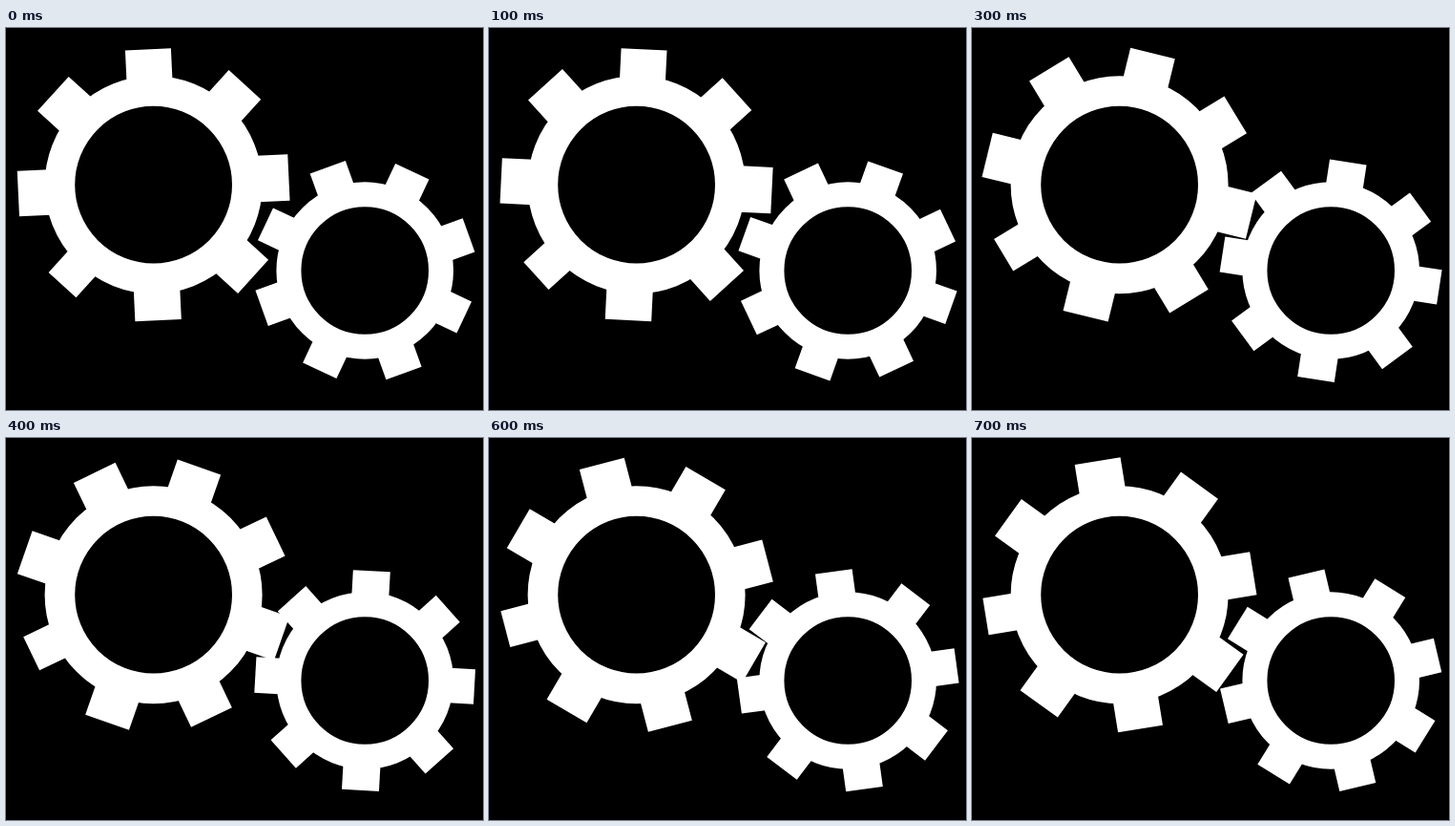
Recreate the animation shown at these times as an HTML page with a canvas. Size 500x400 px, loop 800 ms.

```html
<!DOCTYPE html>
<html lang="en">
<head>
<meta charset="utf-8">
<title>Gears</title>
<style>
  html, body { margin: 0; width: 100%; height: 100%; overflow: hidden; background: #000; }
  canvas { display: block; width: 100%; height: 100%; }
</style>
</head>
<body>
<canvas id="stage" width="500" height="400"></canvas>
<script>
const ctx = document.getElementById('stage').getContext('2d');
const STEP_MS = 100, STEPS = 8, STEP_DEG = 5.5;

// Teeth run clockwise from the top: [width, sideways shift], slightly irregular.
const gears = [
  {
    x: 154.6, y: 164.2, hole: 82.4, body: 114, tip: 142, start: -2.7, dir: 1,
    teeth: [[48, 1], [45.5, 0.3], [48.5, -1], [47.5, 0.8], [48.5, 1.7], [39, 0], [47.5, -2.6], [48.5, -0.3]]
  },
  {
    x: 376.2, y: 254, hole: 66.8, body: 92.8, tip: 115, start: -19.8, dir: -1,
    teeth: [[39.5, 0], [39, 0.7], [37.5, 2], [36.5, 0], [39.5, -2], [39, -1.7], [39.5, -0.4], [37.5, -0.4]]
  }
];

function drawGear(g, step) {
  const ring = g.body - g.hole;
  ctx.save();
  ctx.translate(g.x, g.y);
  ctx.lineWidth = ring;
  ctx.beginPath();
  ctx.arc(0, 0, g.hole + ring / 2, 0, Math.PI * 2);
  ctx.stroke();
  ctx.rotate((g.start + g.dir * STEP_DEG * step) * Math.PI / 180);
  const base = g.body - ring / 3;
  for (const [width, shift] of g.teeth) {
    ctx.fillRect(shift - width / 2, -g.tip, width, g.tip - base);
    ctx.rotate(Math.PI / 4);
  }
  ctx.restore();
}

function draw(now) {
  const step = Math.floor(now / STEP_MS) % STEPS;
  ctx.fillStyle = '#000';
  ctx.fillRect(0, 0, 500, 400);
  ctx.fillStyle = ctx.strokeStyle = '#fff';
  for (const g of gears) drawGear(g, step);
}

let origin;
function tick(now) {
  origin ??= now;
  draw(now - origin);
  requestAnimationFrame(tick);
}
draw(0);
requestAnimationFrame(tick);
</script>
</body>
</html>
```
